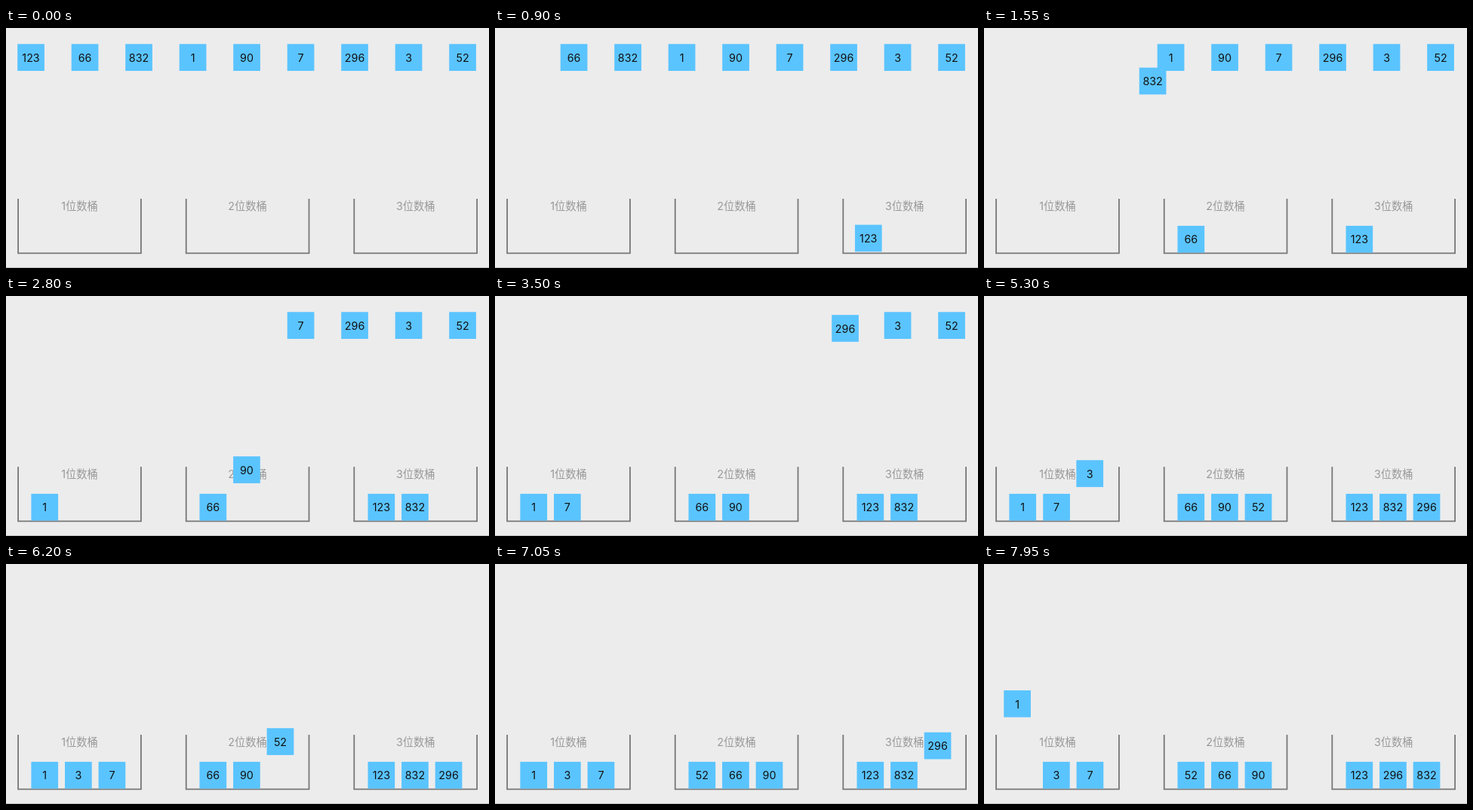
An HTML page that plays this animation: 640x319 px, repeating every 8000 ms.

```html
<!DOCTYPE html>
<html lang="zh-CN">
<head>
<meta charset="utf-8">
<title>桶排序</title>
<style>
  html, body { margin: 0; width: 100%; height: 100%; overflow: hidden; background: #ececec; }
  svg { display: block; width: 640px; height: 319px; }
  text { font: 14.28px Inter, "Noto Sans CJK SC", "Noto Sans CJK", sans-serif; text-anchor: middle; }
</style>
</head>
<body>
<svg id="stage" viewBox="0 0 640 319"></svg>
<script>
const LOOP = 8000, START = 418, MOVE = 507, STEP = 305.7;
const SIZE = 35.7, ROW_Y = 21.3, FLOOR_Y = 262.9, LIFT_Y = 218.2;
const VALUES = [123, 66, 832, 1, 90, 7, 296, 3, 52];
const BUCKET_PITCH = 222.6;

const stage = document.getElementById('stage');

function add(parent, tag, attributes, text = '') {
  const node = document.createElementNS('http://www.w3.org/2000/svg', tag);
  for (const name in attributes) node.setAttribute(name, attributes[name]);
  node.textContent = text;
  return parent.appendChild(node);
}

const rowX = i => 15.2 + 71.5 * i;
const slotX = (bucket, i) => 33.4 + BUCKET_PITCH * 1.002 * bucket + 44.6 * i;
const ease = p => 0.5 - Math.cos(Math.PI * p) / 2;

add(stage, 'rect', { y: 318, width: 640, height: 1, fill: '#c2c2c2' });
for (let b = 0; b < 3; b++) {
  const x = 16.1 + BUCKET_PITCH * b;
  add(stage, 'path', { d: `M${x} 227V299.3h162.8V227`, fill: 'none', stroke: '#777', 'stroke-width': 1.8 });
  add(stage, 'text', { x: x + 81.4, y: 242.2, fill: '#999' }, `${b + 1}位数桶`);
}

const items = VALUES.map((value, i) => {
  const node = add(stage, 'g', {});
  add(node, 'rect', { width: SIZE, height: SIZE, fill: '#5ac4ff' });
  add(node, 'text', { x: SIZE / 2, y: 23.6, fill: '#111' }, value);
  return { value, node, x: rowX(i), y: ROW_Y, moves: [] };
});

// Schedule a move; item.x and item.y track the planned position.
function go(item, start, duration, x, y) {
  item.moves.push({ start, duration, from: [item.x, item.y], to: [x, y] });
  item.x = x;
  item.y = y;
}

const buckets = [[], [], []];
let clock = START;

// Distribute by number of digits.
for (const item of items) {
  const b = String(item.value).length - 1;
  go(item, clock, MOVE, slotX(b, buckets[b].length), FLOOR_Y);
  buckets[b].push(item);
  clock += MOVE;
}

// Insertion sort inside each bucket: lift, slide, drop.
buckets.forEach((bucket, b) => {
  for (let i = 1; i < bucket.length; i++) {
    const item = bucket[i];
    const target = bucket.findIndex(other => other.value >= item.value);
    if (target === i) continue;
    go(item, clock, STEP, item.x, LIFT_Y);
    clock += STEP;
    for (let j = target; j < i; j++) go(bucket[j], clock, STEP, slotX(b, j + 1), FLOOR_Y);
    go(item, clock, STEP, slotX(b, target), LIFT_Y);
    clock += STEP;
    go(item, clock, STEP, item.x, FLOOR_Y);
    clock += STEP;
    bucket.splice(i, 1);
    bucket.splice(target, 0, item);
  }
});

// Collect the sorted items back into the row.
buckets.flat().forEach((item, i) => go(item, clock + i * MOVE, MOVE, rowX(i), ROW_Y));

function position(item, time) {
  const move = item.moves.findLast(m => m.start <= time) || item.moves[0];
  const p = ease(Math.min(1, Math.max(0, (time - move.start) / move.duration)));
  return move.from.map((from, k) => from + (move.to[k] - from) * p);
}

function draw(now) {
  const time = now % LOOP;
  for (const item of items) item.node.setAttribute('transform', `translate(${position(item, time)})`);
  requestAnimationFrame(draw);
}
draw(0);
</script>
</body>
</html>
```
